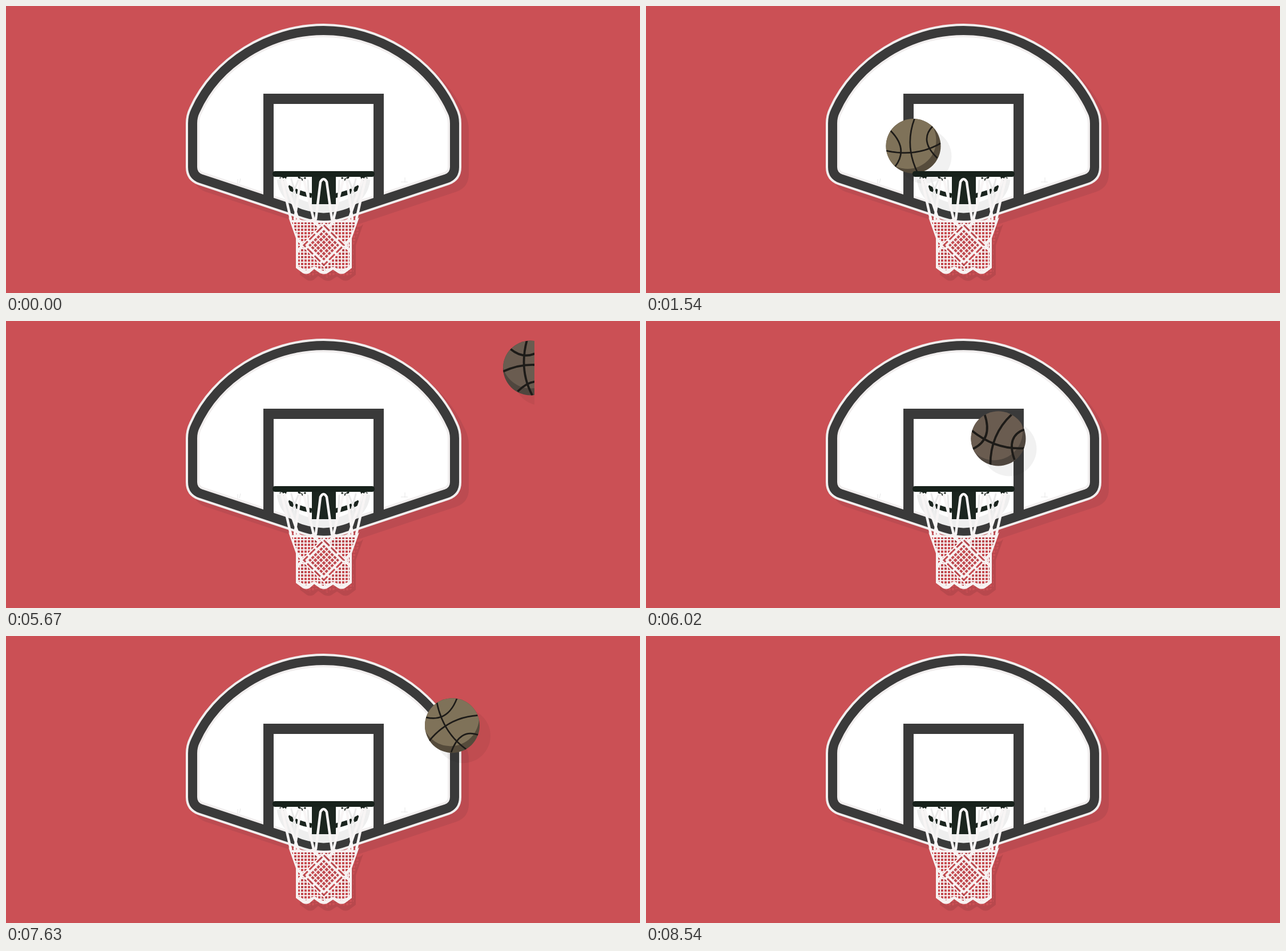
These frames come from a looping animation (1111 by 504 pixels, 9450 ms). An HTML page:

```html
<!DOCTYPE html>
<html lang="en">
<head>
<meta charset="utf-8">
<title>Basketball hoop</title>
<style>
html, body { margin: 0; width: 100%; height: 100%; overflow: hidden; background: #cb5055; }
svg { display: block; width: 100%; height: 100%; }
</style>
</head>
<body>
<svg viewBox="0 0 1111 504" fill="none">
  <defs>
    <path id="board" d="M556.5 43C462 43 370 99 332 184Q327 194 327 206V283Q327 298 341 303L525 364Q556.5 374 588 364L772 303Q786 298 786 283V206Q786 194 781 184C743 99 651 43 556.5 43Z"/>
    <path id="netShape" d="M495 371Q502 380 512 373Q524 380 538 373Q548 381 556 377Q566 381 574 373Q588 380 601 373Q611 380 619 371L606 408V460L594 469Q588 472 582 469L573 463L562 470Q556 472 550 469L540 462L532 469Q526 472 520 469L508 460V408Z"/>
    <pattern id="mesh" width="6" height="6" patternUnits="userSpaceOnUse">
      <rect x="1" y="1" width="4" height="4" fill="#000"/>
    </pattern>
    <pattern id="dots" width="7" height="7" patternUnits="userSpaceOnUse" patternTransform="translate(557 420) rotate(45)">
      <rect x="1" y="1" width="5" height="5" fill="#000"/>
    </pattern>
    <mask id="holes" maskUnits="userSpaceOnUse" x="480" y="360" width="150" height="125">
      <rect x="480" y="360" width="150" height="125" fill="#fff"/>
      <path d="M501 380H613L602 408V457L588 464L573 458L556 465L540 457L526 464L512 457V408Z" fill="url(#mesh)"/>
      <path d="M557 380L597 420L557 460L517 420Z" fill="#fff"/>
      <path d="M504 403L521 420L504 437M610 403L593 420L610 437M534 373L557 396L580 373" stroke="#fff" stroke-width="5"/>
      <path d="M557 393L584 420L557 447L530 420Z" fill="url(#dots)"/>
      <path d="M557 385L592 420L557 455L522 420Z" stroke="#000" stroke-width="3" stroke-dasharray="14 4"/>
    </mask>
    <clipPath id="view"><rect x="112" width="814" height="504"/></clipPath>
    <clipPath id="disc"><circle r="48"/></clipPath>
  </defs>

  <rect width="1111" height="504" fill="#cb5055"/>
  <use href="#board" x="13" y="12" fill="#bc4b51" stroke="#bc4b51" stroke-width="24"/>
  <g transform="translate(7 12)" mask="url(#holes)"><use href="#netShape" fill="#000" opacity=".09"/></g>

  <use href="#board" fill="#fff" stroke="#f1eeee" stroke-width="24"/>
  <use href="#board" stroke="#3a3a3a" stroke-width="16"/>
  <path d="M460 344V163H653V344" stroke="#3a3a3a" stroke-width="18"/>
  <path d="M406 304V312M411 303L409 311M692 309H704M699 301V310" stroke="#e6e6e6"/>

  <path d="M482 304Q488 352 556.5 356Q625 352 631 304" stroke="#eee" stroke-width="15"/>
  <path d="M494 318Q512 329 536 333M619 318Q601 329 577 333" stroke="#1b251f" stroke-width="8"/>
  <rect x="536" y="299" width="42" height="49" fill="#1b251f"/>

  <g id="flight" clip-path="url(#view)">
    <circle id="shade" r="48" fill="#000" opacity=".055"/>
    <g id="ball">
      <circle id="dark" r="48"/>
      <g clip-path="url(#disc)">
        <g id="light"><circle cx="-10" cy="-10" r="50"/></g>
        <path id="seams" stroke="#1d1b18" d="M2 -48Q-16 0 8 48M-48 8Q5 20 48 -5M-40 -27Q-8 5 -32 36M34 -35Q9.5 -10 42 21"/>
      </g>
    </g>
  </g>

  <g id="cords"></g>
  <rect x="467" y="290" width="179" height="10" rx="4.5" fill="#17211b"/>
  <g mask="url(#holes)"><use href="#netShape" fill="#f7f1f1"/></g>
</svg>
<script>
const STEP = 70, LOOP = 9450;
const $ = id => document.getElementById(id);

// Arc: first step, x, y, speed x, speed y, half gravity (all per step).
const throws = [
  { start: 1050, steps: 14, fill: '#7f7259', dark: '#554b3b', seam: 2.7,
    arcs: [[0, 95, 143, 53.4, -36.8, 7.36], [7, 468.5, 246, 79.7, -76, 7.36]] },
  { start: 5670, steps: 12, fill: '#6a5c50', dark: '#4f463e', seam: 3.8,
    arcs: [[0, 919, 82.5, -60.3, -8.2, 6.6], [6, 557, 271, 0, 50, 0]] },
  { start: 7490, steps: 15, fill: '#7f7259', dark: '#554b3b', seam: 2.7,
    arcs: [[0, 940, 106, -79, 7.6, 9], [3.5, 664.3, 242.7, -53.8, -65.7, 9]] }
];

function buildCords() {
  const line = (d, color, width) =>
    `<path d="${d}" stroke="${color}" stroke-width="${width}" stroke-linecap="round"/>`;
  const half =
    line('M500 304L510 340M512 306L497 345M529 306L531 345', '#e9e9e9', 3) +
    line('M481 302L490 301L488 306M513 301L521 306L524 302', '#17211b', 3) +
    line('M483 303L499 374M488 304L512 374M516 305L506 374M522 305L539 374', '#f8f5f5', 4.5);
  $('cords').innerHTML = half + `<g transform="matrix(-1 0 0 1 1113 0)">${half}</g>` +
    line('M550 303L557 301L563 305', '#17211b', 3) +
    line('M543 374L551 309Q556.5 299 562 309L571 374', '#f8f5f5', 4.5);
}

function place(arcs, k) {
  const [from, x, y, vx, vy, g] = arcs.filter(a => a[0] <= k).pop();
  const d = k - from;
  return [x + vx * d, y + vy * d + g * d * d];
}

function draw(time) {
  const t = time % LOOP;
  const shot = throws.find(s => t >= s.start && t < s.start + s.steps * STEP);
  $('flight').style.display = shot ? '' : 'none';
  if (!shot) return;
  const k = Math.floor((t - shot.start) / STEP);
  const [x, y] = place(shot.arcs, k);
  const spin = 92 * (1 - k / 7);
  $('ball').setAttribute('transform', `translate(${x} ${y})`);
  $('shade').setAttribute('transform', `translate(${x + 19} ${y + 18})`);
  $('light').setAttribute('transform', `rotate(${spin / 2})`);
  $('seams').setAttribute('transform', `rotate(${spin})`);
  $('seams').setAttribute('stroke-width', shot.seam);
  $('light').setAttribute('fill', shot.fill);
  $('dark').setAttribute('fill', shot.dark);
}

buildCords();
const begin = performance.now();
function tick() {
  draw(performance.now() - begin);
  requestAnimationFrame(tick);
}
tick();
</script>
</body>
</html>
```
